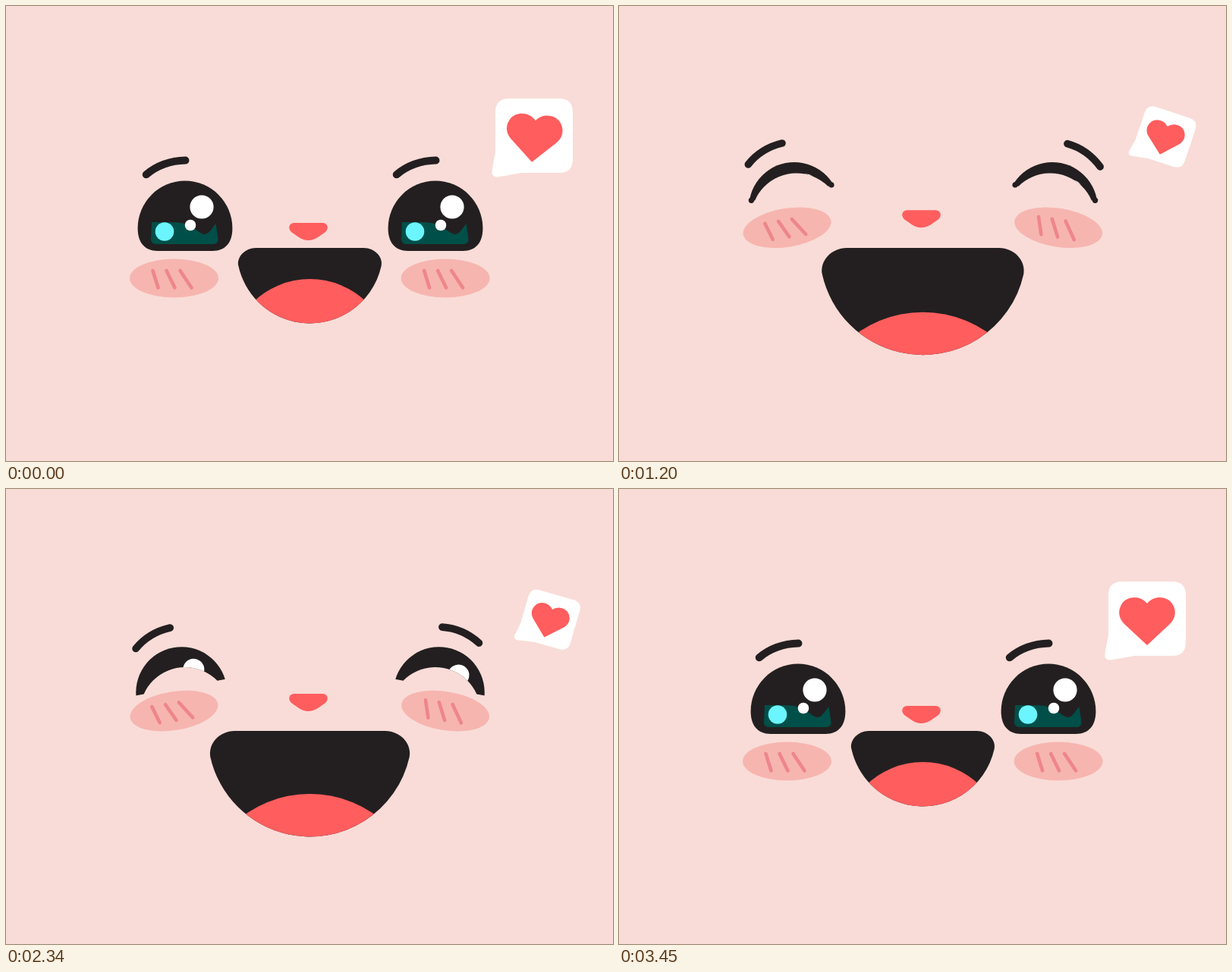
An HTML page with a canvas for the animation above (3480 ms loop, 800 px wide and 600 px high).

```html
<!DOCTYPE html>
<html lang="en">
<head>
<meta charset="utf-8">
<title>Happy face</title>
<style>
html, body { margin: 0; width: 100%; height: 100%; overflow: hidden; background: #f9dcd7; }
canvas { display: block; }
</style>
</head>
<body>
<canvas id="stage" width="800" height="600"></canvas>
<script>
const ctx = document.getElementById('stage').getContext('2d');
const LOOP = 3480, STEP = 30, DEG = Math.PI / 180;
const BG = '#f9dcd7', DARK = '#231f20', CORAL = '#ff5d5e', WHITE = '#fff';
const BLUSH = '#f7b5b0', MARK = '#ee868a', TEAL = '#004f49', CYAN = '#6bf5ff';

const DOME = new Path2D('M-62.4 0A62.4 62.4 0 0 1 62.4 0C62.4 18 54 30 36 30H-36C-54 30-62.4 18-62.4 0Z');
const BROW = new Path2D('M-27.5 0Q-1-9.5 27.5 0');
const NOSE = new Path2D('M380 286H417C424 286 426 293 421 298L411 305Q398 313 386 305L376 298C371 293 373 286 380 286Z');
const BUBBLE = new Path2D('M-33-50H33Q51-50 51-32V30Q51 48 33 48H-16L-48 53.5Q-57 54-55.5 45L-51 20V-32Q-51-50-33-50Z');
const HEART = new Path2D('M0-21C-10-33-27-30-33-21C-39-12-38-2-30 6L0 34L30 6C38-2 39-12 33-21C27-30 10-33 0-21Z');

const mix = (a, b, k) => a + (b - a) * k;

// Eased 0 to 1 between two times
function ramp(t, from, to) {
  const u = Math.min(1, Math.max(0, (t - from) / (to - from)));
  return (1 - Math.cos(Math.PI * u)) / 2;
}

// Rises over a..b, falls back over c..d
const hold = (t, a, b, c, d) => ramp(t, a, b) - ramp(t, c, d);

function placed(x, y, degrees, scale, draw) {
  ctx.save();
  ctx.translate(x, y);
  ctx.rotate(degrees * DEG);
  ctx.scale(scale, scale);
  draw();
  ctx.restore();
}

function fill(path, color) {
  ctx.fillStyle = color;
  ctx.fill(path);
}

function stroke(path, color, width) {
  ctx.strokeStyle = color;
  ctx.lineWidth = width;
  ctx.stroke(path);
}

function ellipse(x, y, rx, ry, color) {
  ctx.fillStyle = color;
  ctx.beginPath();
  ctx.ellipse(x, y, rx, ry, 0, 0, 7);
  ctx.fill();
}

const dot = (x, y, r, color) => ellipse(x, y, r, r, color);

// One wave whose trough slides from right to left
function tears(wave) {
  const path = new Path2D();
  const bend = mix(3, 0.8, wave);
  for (let u = 0; u <= 1; u += 0.04) {
    path.lineTo(-44 + 88 * u, -8 * Math.cos(2 * Math.PI * u ** bend));
  }
  path.arcTo(44.5, 21, 38, 21, 6);
  path.arcTo(-45, 21, -45, 15, 6);
  path.closePath();
  fill(path, TEAL);
}

function eye(x, y, side, p) {
  placed(x, y, side * 11 * p.squint, 1 - 0.04 * p.squint, () => {
    // The lower lid is a circle rising over the eye
    const edge = p.lid - 35;
    ctx.save();
    if (p.lid < 70) {
      ctx.beginPath();
      ctx.moveTo(-90, -90);
      ctx.lineTo(90, -90);
      ctx.lineTo(90, edge);
      ctx.arc(0, p.lid, 62, -34.4 * DEG, -145.6 * DEG, true);
      ctx.lineTo(-90, edge);
      ctx.clip();
    }
    fill(DOME, DARK);
    tears(p.wave);
    dot(-27, 4.5, 11.8 * p.shine, CYAN);
    dot(22, -28, 15 * p.shine, WHITE);
    dot(7, -4, 7 * p.shine, WHITE);
    ctx.restore();
    if (p.lid < 20) for (const end of [-1, 1]) dot(end * 56, edge - 1, 3.8, DARK);
  });
}

// A brow slides on a circle around its eye
function brow(x, y, angle, squint) {
  placed(x, y, angle, 1 - 0.04 * squint, () => {
    placed(0, -84, 0.13 * angle, 1, () => stroke(BROW, DARK, 10));
  });
}

function cheek(x, y, degrees) {
  placed(x, y, degrees, 1, () => {
    ellipse(0, 0, 58.5, 25.5, BLUSH);
    const marks = new Path2D();
    for (let i = 0; i < 3; i++) {
      marks.moveTo(-28 + 18 * i, -10);
      marks.lineTo(-21 + 22 * i, 12.5);
    }
    stroke(marks, MARK, 4.6);
  });
}

function mouth(laugh) {
  const w = 95 + 39.8 * laugh, corner = 24 + 10 * laugh;
  const bottom = 99.5 + 42.5 * laugh, r = w * 1.015, tilt = 0.22;
  const tongue = 107 + 43 * laugh;
  const startX = r * Math.cos(tilt), startY = bottom - r + r * Math.sin(tilt);
  const path = new Path2D();
  path.moveTo(corner - w, 0);
  path.lineTo(w - corner, 0);
  path.bezierCurveTo(w - corner * 0.4, 0, w + 2, corner * 0.5, startX, startY);
  path.arc(0, bottom - r, r, tilt, Math.PI - tilt);
  path.bezierCurveTo(-w - 2, corner * 0.5, corner * 0.4 - w, 0, corner - w, 0);
  placed(400.5, 319, 0, 1, () => {
    fill(path, DARK);
    ctx.clip(path);
    dot(0, 41 + 44.6 * laugh + tongue, tongue, CORAL);
  });
}

function bubble(t) {
  const swing = hold(t, 940, 1150, 2340, 2700) + 0.2 * hold(t, 940, 1150, 1150, 1300);
  const size = 1 - 0.31 * hold(t, 860, 1217, 2340, 2720);
  const tilt = 5 * Math.cos(2 * Math.PI * t / 1900) * (1 - ramp(t, 2100, 2700));
  placed(696 + 20 * swing, 172 + swing, 16 * swing, size, () => {
    fill(BUBBLE, WHITE);
    placed(0, 0, tilt, 1, () => fill(HEART, CORAL));
  });
}

function draw(t) {
  const squint = hold(t, 930, 1200, 2280, 2660);
  const rightTurn = hold(t, 930, 1200, 2190, 2680);
  const blush = 0.3 * hold(t, 400, 960, 2600, 3400) + 0.7 * hold(t, 960, 1200, 2340, 2600);
  const giggle = t > 1230 && t < 2260 ? 0.175 * (1 - Math.cos(4 * Math.PI * (t - 1230) / 1030)) : 0;
  const laugh = hold(t, 900, 1230, 2260, 2770) - giggle;
  const sag = squint * (1 - laugh);
  const wave = hold(t, 0, 990, 2100, 3400);
  const pose = {
    squint, wave,
    lid: 75 - 60 * hold(t, 990, 1170, 2260, 2520),
    shine: 1.04 - 0.07 * wave
  };

  ctx.fillStyle = BG;
  ctx.fillRect(0, 0, 800, 600);
  ctx.lineCap = 'round';

  for (const side of [-1, 1]) {
    const x = 401 + side * (165 + 5 * squint), y = 293 - 27.5 * squint + 20 * sag;
    eye(x, y, side, pose);
    brow(x, y, side < 0 ? mix(-17.6, -28.4, squint) : mix(-17.6, 31, rightTurn), squint);
    cheek(400.3 + side * 178.8, 359 - 67 * blush + 11 * sag, side * 9 * blush);
  }

  placed(0, -17 * laugh, 0, 1, () => fill(NOSE, CORAL));
  mouth(laugh);
  bubble(t);
}

const start = performance.now();
function tick() {
  const t = (performance.now() - start) % LOOP;
  draw(Math.floor(t / STEP) * STEP);
  requestAnimationFrame(tick);
}
tick();
</script>
</body>
</html>
```
